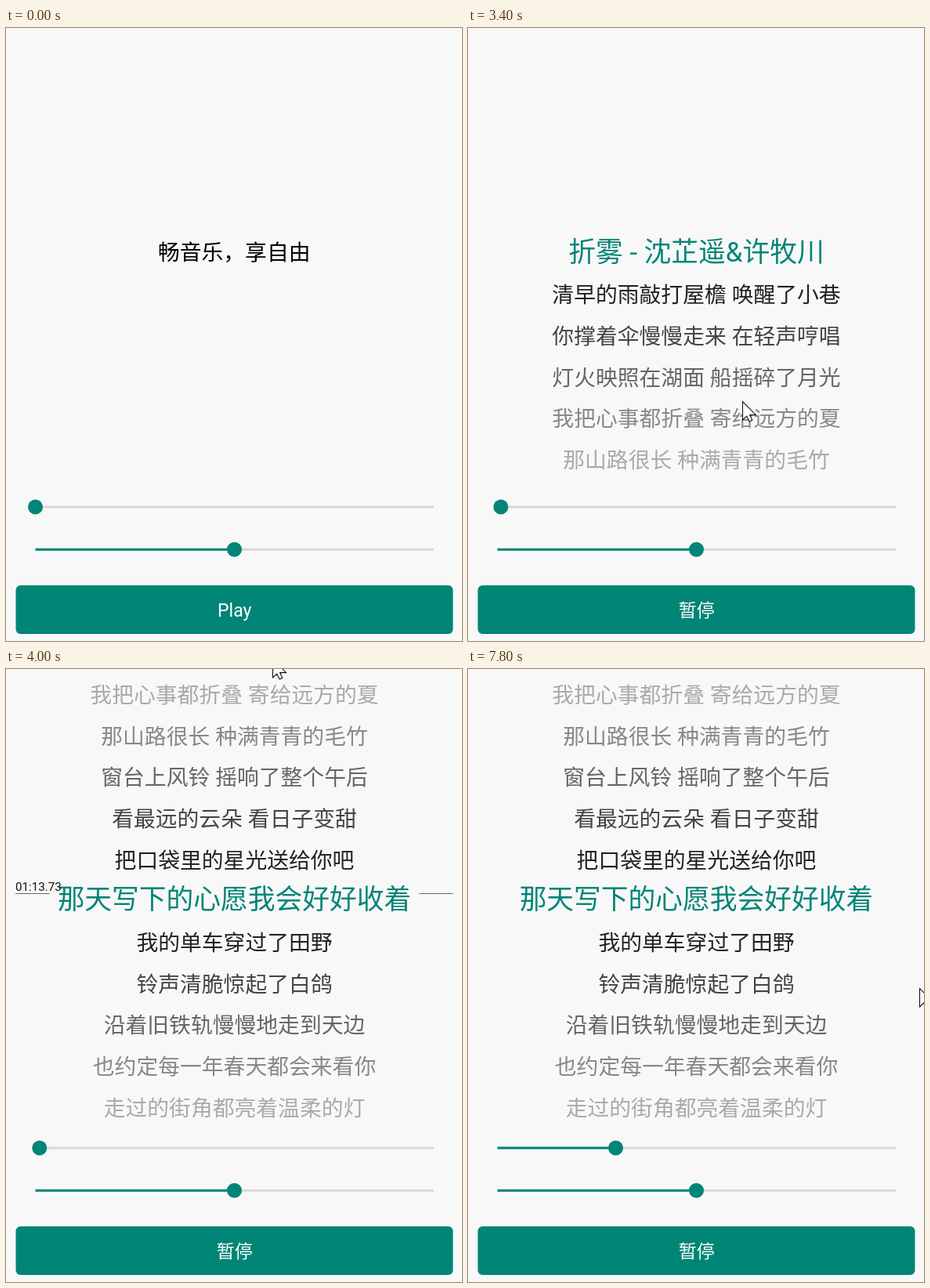
Animation of 582 by 782 pixels, one loop 8 s. Source, as an HTML page:

```html
<!DOCTYPE html>
<html lang="zh-CN">
<head>
<meta charset="utf-8">
<title>Lyric player</title>
<style>
  html, body { margin: 0; width: 100%; height: 100%; overflow: hidden; background: #f8f8f8; }
  svg { display: block; font-family: Roboto, "Noto Sans CJK SC", "Noto Sans CJK", sans-serif; }
  .mid { text-anchor: middle; }
  .teal { fill: #008577; }
  .track { fill: #d8d8d8; }
</style>
</head>
<body>
<svg width="582" height="782" viewBox="0 0 582 782">
  <defs><clipPath id="view"><rect width="582" height="577"/></clipPath></defs>
  <text id="slogan" class="mid" x="291.2" y="296" font-size="27.8">畅音乐，享自由</text>
  <g id="rows" clip-path="url(#view)"></g>
  <g id="guide">
    <path id="rule" stroke="#666" fill="none"/>
    <text id="stamp" x="12" y="282.7" font-size="15.2" fill="#111"></text>
  </g>
  <g id="sliders"></g>
  <g id="button">
    <rect class="teal" x="12.5" y="711" width="558" height="62" rx="6"/>
    <text id="label" class="mid" x="291.7" y="751" font-size="23" fill="#fff"></text>
  </g>
  <path id="cursor" d="M.5 .5V24L5.7 19.2L9.2 26L12.8 24.4L9.6 17.6H17.5Z" fill="#fff" stroke="#111" stroke-width="1.1"/>
</svg>
<script>
const LOOP = 8000, STEP = 100, CX = 291.5, SIZE = 27.8, GAP = 52.7, BASE = 297.5;
const TEAL = [0, 133, 119];
const LINES = [
  '折雾 - 沈芷遥&许牧川',
  '清早的雨敲打屋檐 唤醒了小巷',
  '你撑着伞慢慢走来 在轻声哼唱',
  '灯火映照在湖面 船摇碎了月光',
  '我把心事都折叠 寄给远方的夏',
  '那山路很长 种满青青的毛竹',
  '窗台上风铃 摇响了整个午后',
  '看最远的云朵 看日子变甜',
  '把口袋里的星光送给你吧',
  '那天写下的心愿我会好好收着',
  '我的单车穿过了田野',
  '铃声清脆惊起了白鸽',
  '沿着旧铁轨慢慢地走到天边',
  '也约定每一年春天都会来看你',
  '走过的街角都亮着温柔的灯'
];
// time, x, y of the pointer
const POINTER = [
  [0, 351, 737], [2900, 351, 737], [3400, 350, 476], [3500, 348, 452],
  [3600, 345, 340], [3700, 340, 200], [3800, 336, 80], [3900, 338, 10],
  [4000, 340, -13], [4100, 341, -5], [4500, 362, 310], [5400, 362, 310],
  [5700, 576, 407]
];
const PRESS = [[0, 1], [100, 1], [200, .8], [400, .8], [700, 1]];
const TICKS = [1300, 1700, 2200, 2700, 3100, 3600, 4100, 4500, 5000, 5500, 5900, 6400, 6800, 7300, 7800];
const SHOW = 400, GRAB = 3500, DROP = 4100;

const $ = id => document.getElementById(id);
const clamp = (v, a, b) => Math.min(b, Math.max(a, v));

function add(parent, tag, attrs) {
  const el = document.createElementNS('http://www.w3.org/2000/svg', tag);
  set(el, attrs);
  parent.append(el);
  return el;
}

function set(el, attrs) {
  for (const k in attrs) el.setAttribute(k, attrs[k]);
}

function show(el, on) {
  el.style.display = on ? '' : 'none';
}

function sample(keys, t) {
  const i = keys.findIndex(k => k[0] > t);
  if (i < 0) return keys[keys.length - 1].slice(1);
  const a = keys[i - 1], b = keys[i], p = (t - a[0]) / (b[0] - a[0]);
  return a.slice(1).map((v, n) => v + (b[n + 1] - v) * p);
}

function slider(y) {
  const g = $('sliders');
  add(g, 'rect', { class: 'track', x: 37.5, y: y - 1.5, width: 508.5, height: 3 });
  const fill = add(g, 'rect', { class: 'teal', x: 37.5, y: y - 1.5, height: 3 });
  const knob = add(g, 'circle', { class: 'teal', cy: y, r: 9.5 });
  return x => {
    set(fill, { width: x - 37.5 });
    set(knob, { cx: x });
  };
}

const seek = slider(611), volume = slider(665.3);
volume(291.5);

const rows = LINES.map(line => {
  const el = add($('rows'), 'text', { class: 'mid', x: CX });
  el.textContent = line;
  return el;
});

function rowColor(d) {
  const rgb = d >= 1 ? Array(3).fill(34 * d) : TEAL.map(c => c + (34 - c) * d);
  return `rgb(${rgb.map(v => Math.round(Math.min(v, 248)))})`;
}

function lineTime(i) {
  const sec = i === 0 ? 0 : 66.13 + (i - 7) * (i < 7 ? 6.7 : 3.8);
  const pad = v => String(v).padStart(2, '0');
  return pad(Math.floor(sec / 60)) + ':' + (sec % 60).toFixed(2).padStart(5, '0');
}

function lineWidth(line) {
  return [...line].reduce((w, c) => w + (c === ' ' ? .25 : c === '-' ? .28 : c === '&' ? .62 : 1), 0);
}

function render(t) {
  const [x, y] = sample(POINTER, t);
  show($('cursor'), t >= 100);
  set($('cursor'), { transform: `translate(${x} ${y})` });

  const playing = t >= SHOW;
  show($('slogan'), !playing);
  show($('rows'), playing);
  $('label').textContent = playing ? '暂停' : 'Play';
  set($('button'), { opacity: sample(PRESS, t)[0] });

  // The list follows the pointer once it has moved past the drag threshold.
  const scroll = t < 3400 ? 0 : t < 4000 ? Math.max(0, 452.5 - y) : 465.5;
  const current = t < 3400 ? clamp((t - 1200) / 500, 0, 1) - 1 : Math.round(scroll / GAP);
  rows.forEach((el, i) => {
    const d = Math.abs(i - current), base = BASE + i * GAP - scroll;
    set(el, { y: base, 'font-size': SIZE * (1.25 - .25 * Math.min(d, 1)), fill: rowColor(d) });
    show(el, base > -10 && base < 590);
  });

  const dragging = t >= GRAB && t < DROP;
  show($('guide'), dragging);
  if (dragging) {
    const half = lineWidth(LINES[current]) * SIZE * .625 + 10;
    set($('rule'), { d: `M12 286.5H${CX - half}M${CX + half} 286.5H570.5` });
    $('stamp').textContent = lineTime(current);
  }

  const ticks = TICKS.filter(k => k <= t).length;
  seek(t < DROP ? 37.5 + ticks * .88 : 174.8 + ticks * .913);
}

function loop() {
  const t = performance.now() % LOOP;
  render(Math.floor(t / STEP) * STEP);
  requestAnimationFrame(loop);
}
loop();
</script>
</body>
</html>
```
